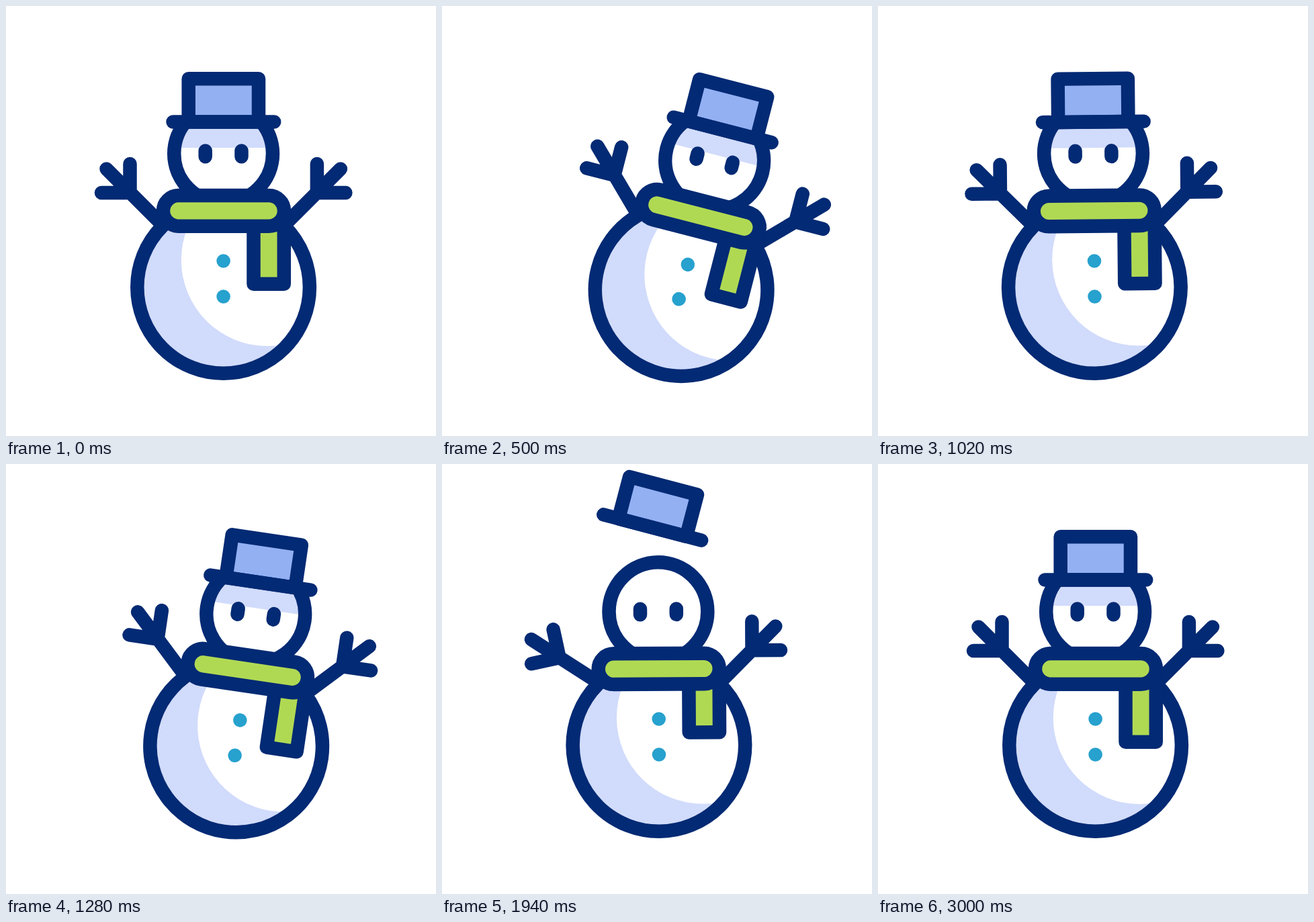
An HTML page for the animation above (3.02 s loop, 640x640 px).

```html
<!DOCTYPE html>
<html lang="en">
<head>
<meta charset="utf-8">
<title>Snowman</title>
<style>
  html, body { margin: 0; width: 100%; height: 100%; overflow: hidden; background: #fff; }
  svg { display: block; width: 100vw; height: 100vh; }
  .line { fill: none; stroke: #032a74; stroke-width: 20.5; stroke-linecap: round; stroke-linejoin: round; }
  .green { fill: #b0d953; }
  .shade { fill: #d1dbfb; }
</style>
</head>
<body>
<svg viewBox="0 0 640 640">
  <defs>
    <clipPath id="bodyClip"><circle cx="323.6" cy="418.5" r="128"/></clipPath>
    <clipPath id="headClip"><circle cx="323.6" cy="219.7" r="73"/></clipPath>
    <path id="arm" class="line" d="M184.5 235V278H142M149.5 242.5L231 324"/>
  </defs>
  <g id="snowman">
    <use id="wavingArm" href="#arm"/>
    <use href="#arm" transform="matrix(-1 0 0 1 647.4 0)"/>

    <circle class="shade" cx="323.6" cy="418.5" r="128"/>
    <circle cx="389" cy="378" r="128.2" fill="#fff" clip-path="url(#bodyClip)"/>
    <circle class="line" cx="323.6" cy="418.5" r="128.3"/>
    <g fill="#27a1ce">
      <circle cx="323.6" cy="379.5" r="10.3"/>
      <circle cx="323.6" cy="432.5" r="10.3"/>
    </g>

    <circle cx="323.6" cy="219.7" r="73" fill="#fff"/>
    <g clip-path="url(#headClip)">
      <rect id="hatShadow" class="shade" x="240" y="120" width="168" height="91"/>
    </g>
    <circle class="line" cx="323.6" cy="219.7" r="73.4"/>
    <path class="line" d="M296.7 215.6v8.6M350.5 215.6v8.6"/>

    <path id="tail" class="line green" style="fill:#b0d953"/>
    <rect class="line" style="fill:#b0d953" x="234" y="282" width="180" height="45.7" rx="22.8"/>

    <g id="hat">
      <path class="line" style="fill:#93b0f3" d="M271.7 172.5V108.2H376V172.5Z"/>
      <path class="line" d="M248.5 172.5H399.2"/>
    </g>
  </g>
</svg>
<script>
const LOOP = 3020;
const part = id => document.getElementById(id);
const [snowman, arm, shadow, tail, hat] =
  ["snowman", "wavingArm", "hatShadow", "tail", "hat"].map(part);

// Keys are [time in ms, value] pairs.
const swayKeys = [[0, 0], [400, 20], [800, -15], [1200, 10], [1600, -5], [2000, 0]];
const waveKeys = [[1600, 0], [1880, -15], [2160, 10], [2440, -10], [2720, 5], [3000, 0]];
const hatKeys = [[1533, 0], [1933, 1], [2033, 1], [2500, 0]];
const tailKeys = [[1540, 0], [1940, -14], [2320, 87], [2700, 0]];

const smooth = u => u * u * (3 - 2 * u);

function valueAt(keys, t) {
  if (t <= keys[0][0]) return keys[0][1];
  for (let i = 1; i < keys.length; i++) {
    const [t0, a] = keys[i - 1], [t1, b] = keys[i];
    if (t < t1) return a + (b - a) * smooth((t - t0) / (t1 - t0));
  }
  return keys[keys.length - 1][1];
}

function draw(t) {
  const jump = valueAt(hatKeys, t);
  const lift = -77 * jump;
  snowman.setAttribute("transform", `rotate(${valueAt(swayKeys, t)} 323.6 549)`);
  arm.setAttribute("transform", `rotate(${valueAt(waveKeys, t)} 226 323)`);
  hat.setAttribute("transform", `translate(0 ${lift}) rotate(${15 * jump} 323.6 140.5)`);
  shadow.setAttribute("transform", `translate(0 ${lift})`);
  tail.setAttribute("d", `M368.5 315V${413.7 + valueAt(tailKeys, t)}H413.8V315Z`);
}

const start = performance.now();
function tick() {
  draw((performance.now() - start) % LOOP);
  requestAnimationFrame(tick);
}
draw(0);
requestAnimationFrame(tick);
</script>
</body>
</html>
```
